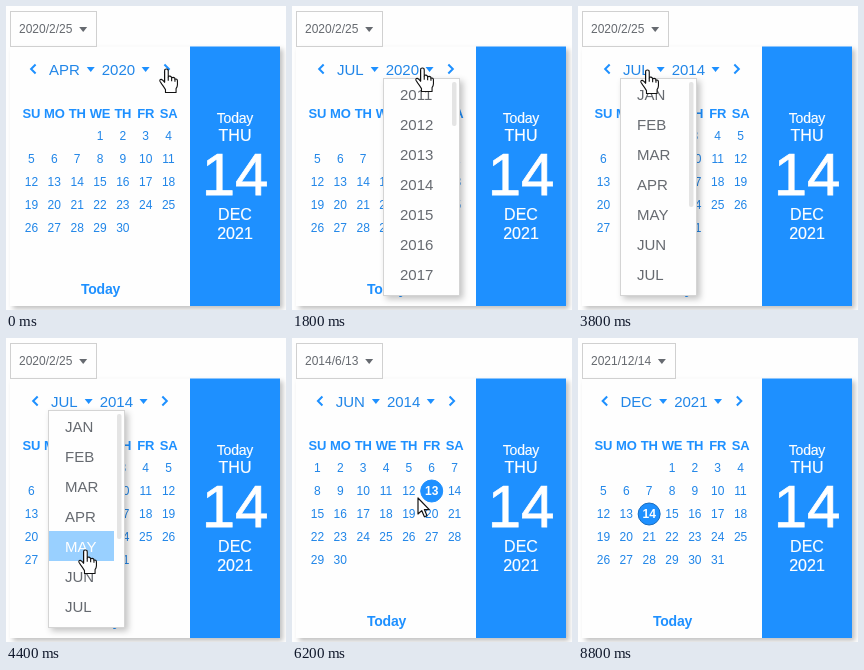
Recreate the animation shown at these times as an HTML page. Size 280 by 304 pixels, loop 9200 ms.

```html
<!DOCTYPE html>
<html lang="en">
<head>
<meta charset="utf-8">
<title>Date picker</title>
<style>
  html, body { margin: 0; width: 100%; height: 100%; overflow: hidden; background: #fefefe; }
  svg { display: block; width: 280px; height: 304px; font-family: "Liberation Sans", Arial, sans-serif; }
  .mid { text-anchor: middle; }
  .bold { font-weight: bold; }
  .tight { letter-spacing: -.2px; }
  .panel { filter: drop-shadow(3px 3px 2.5px rgba(0, 0, 0, .24)); }
  .pop { filter: drop-shadow(3px 3px 3px rgba(0, 0, 0, .24)); }
</style>
</head>
<body>
<svg id="stage" viewBox="0 0 280 304"></svg>
<script>
const LOOP = 9200, STEP = 200;
const BLUE = '#1e90ff', INK = '#2186e8', GRAY = '#666a70';
const MONTHS = 'JAN FEB MAR APR MAY JUN JUL AUG SEP OCT NOV DEC'.split(' ');
const WEEK = 'SU MO TH WE TH FR SA'.split(' ');
const ROW = 30, LIST_TOP = 73, LIST_H = 216.5;
const stage = document.getElementById('stage');

function add(parent, tag, attrs = {}, text) {
  const node = document.createElementNS('http://www.w3.org/2000/svg', tag);
  for (const key in attrs) node.setAttribute(key, attrs[key]);
  if (text !== undefined) node.textContent = text;
  parent.append(node);
  return node;
}

function label(parent, text, x, y, size, fill, cls = '') {
  return add(parent, 'text', { x, y, fill, class: cls, 'font-size': size }, text);
}

function caret(parent, x, y, fill) {
  add(parent, 'path', { d: `M${x - 4} ${y}h8l-4 5z`, fill });
}

function chevron(parent, x, dir) {
  add(parent, 'path', {
    d: `M${x - 2.2 * dir} 58.5l${4.5 * dir} 4.5l${-4.5 * dir} 4.5`,
    fill: 'none', stroke: BLUE, 'stroke-width': 2
  });
}

const colX = i => 14 + (i + .5) * 160 / 7;
const rowY = r => 130 + 23 * r;

// Static parts
const panel = add(stage, 'g', { class: 'panel' });
add(panel, 'rect', { x: 4, y: 40.5, width: 270, height: 259.5, fill: '#fefefe' });
add(panel, 'rect', { x: 184, y: 40.5, width: 90, height: 259.5, fill: BLUE });
[['Today', 117, 14, 'tight'], ['THU', 135, 16], ['14', 188.5, 60], ['DEC', 214, 16], ['2021', 233, 16]]
  .forEach(([text, y, size, cls = '']) => {
    const node = label(stage, text, 229, y, size, '#fff', 'mid ' + cls);
    node.setAttribute('stroke', '#fff');
    node.setAttribute('stroke-width', size / 80);
  });
WEEK.forEach((day, i) => label(stage, day, colX(i), 112, 13, BLUE, 'mid bold tight'));
label(stage, 'Today', 94.5, 288, 14, BLUE, 'mid bold tight');

const field = add(stage, 'g');
const head = add(stage, 'g');
const grid = add(stage, 'g');
const popup = add(stage, 'g');

const outline = { fill: '#fff', stroke: '#111', 'stroke-width': 1.2, 'stroke-linejoin': 'round' };
const hand = add(stage, 'g', outline);
const handShape = add(hand, 'g', { transform: 'translate(-.6 0) scale(.92 .98)' });
add(handShape, 'path', {
  d: 'M-2 2Q-2 0 0 0Q2 0 2 2V8.5Q2 7 4 7.3Q5.5 7.6 5.7 9Q7.5 8 9 9.2L9.3 10.3Q11.8 9.8 12 12V16' +
     'Q12 18 10.5 20V24H-1V21Q-3 18 -5 15.5L-7 12.5Q-7.6 10.4 -5.5 10.6Q-4 11 -2 13.5Z'
});
add(handShape, 'path', { d: 'M-2 13.5V2M2 8.5V12M5.7 9V12.5M9.3 10.3V13', fill: 'none' });
const arrow = add(stage, 'g', outline);
add(arrow, 'path', { d: 'M0 0V16L3.7 12.6L6.4 18.8L9 17.7L6.4 11.6H11.3Z' });

// State changes: time, then what becomes different
const start = { year: 2020, month: 3, picked: [2020, 1, 25], list: '', pointer: 'hand' };
const changes = [
  [200, { month: 4 }],
  [600, { month: 5 }],
  [1000, { month: 6 }],
  [1800, { list: 'year' }],
  [2600, { list: '', year: 2014 }],
  [2800, { pointer: 'arrow' }],
  [3400, { pointer: 'hand' }],
  [3800, { list: 'month' }],
  [5200, { list: '', month: 5, pointer: 'arrow' }],
  [6000, { picked: [2014, 5, 13] }],
  [7200, { pointer: 'hand' }],
  [7400, { picked: [2021, 11, 14], year: 2021, month: 11 }],
  [8800, { pointer: '' }]
];

// Pointer path: time, x, y of the tip
const path = [
  [0, 161, 63], [1000, 161, 63], [1400, 131, 62], [1800, 131, 62],
  [2000, 128, 90], [2400, 120, 176], [2600, 118, 172], [2800, 113, 169],
  [3000, 108, 150], [3400, 72, 64], [3800, 70, 64], [4000, 70, 82],
  [4400, 80, 212], [4800, 81, 236], [5200, 81, 234], [5800, 128, 158],
  [6000, 126, 160], [6400, 126, 160], [6600, 124, 172], [7200, 95, 279],
  [8000, 95, 279], [8800, 100, 308], [LOOP, 100, 308]
];

function pointerAt(t) {
  const i = path.findIndex(p => p[0] > t);
  const [t0, x0, y0] = path[i - 1], [t1, x1, y1] = path[i];
  const k = (t - t0) / (t1 - t0);
  return [x0 + (x1 - x0) * k, y0 + (y1 - y0) * k];
}

function drawField([y, m, d]) {
  field.replaceChildren();
  const text = label(field, `${y}/${m + 1}/${d}`, 13, 27, 12, GRAY);
  const w = text.getComputedTextLength();
  add(field, 'rect', { x: 4.5, y: 5.5, width: Math.round(w + 33), height: 35, fill: 'none', stroke: '#d0d0d0' });
  caret(field, 23.8 + w, 21, GRAY);
}

// Returns the left edges of both names, where the lists attach
function drawHead(s) {
  head.replaceChildren();
  const month = label(head, MONTHS[s.month], 0, 69, 15, INK);
  const year = label(head, s.year, 0, 69, 15, INK);
  const mw = month.getComputedTextLength(), yw = year.getComputedTextLength();
  const left = 94 - (69 + mw + yw) / 2;
  const monthX = left + 15.5, yearX = monthX + mw + 22;
  month.setAttribute('x', monthX);
  year.setAttribute('x', yearX);
  chevron(head, left, -1);
  caret(head, monthX + mw + 11, 61, BLUE);
  caret(head, yearX + yw + 10.5, 61, BLUE);
  chevron(head, yearX + yw + 31.5, 1);
  return { month: monthX, year: yearX };
}

function drawGrid(s) {
  grid.replaceChildren();
  const first = new Date(s.year, s.month, 1).getDay();
  const count = new Date(s.year, s.month + 1, 0).getDate();
  const [py, pm, pd] = s.picked;
  for (let d = 1; d <= count; d++) {
    const cell = first + d - 1;
    const x = colX(cell % 7), y = rowY(Math.floor(cell / 7));
    const on = py === s.year && pm === s.month && pd === d;
    if (on) {
      const ring = py === 2021 ? '#1a6dc0' : BLUE;
      add(grid, 'circle', { cx: x, cy: y, r: 11, fill: BLUE, stroke: ring });
    }
    label(grid, d, x, y + 4, 12, on ? '#fff' : INK, on ? 'mid bold' : 'mid');
  }
}

function drawList(s, edges, [px, py]) {
  popup.replaceChildren();
  if (!s.list) return;
  const isYear = s.list === 'year';
  const x = Math.round(edges[s.list] - 3) + .5;
  const box = add(popup, 'g', { class: 'pop' });
  add(box, 'rect', { x, y: LIST_TOP - .5, width: 76, height: LIST_H + .5, fill: '#fefefe', stroke: '#d4d4d4' });
  const over = px > x && px < x + 76 ? Math.floor((py - LIST_TOP) / ROW) : -1;
  for (let i = 0; i < 7; i++) {
    const y = LIST_TOP + ROW * i;
    if (i === over) add(popup, 'rect', { x: x + .5, y, width: 65, height: ROW, fill: '#99d0ff' });
    label(popup, isYear ? 2011 + i : MONTHS[i], x + 16.5, y + 21, 15, i === over ? '#fff' : GRAY);
  }
  add(popup, 'rect', { x: x + 68.5, y: 76, width: 4.5, height: isYear ? 44 : 125, rx: 2, fill: '#e4e4e4' });
}

function place(node, shown, [x, y]) {
  node.setAttribute('visibility', shown ? 'visible' : 'hidden');
  node.setAttribute('transform', `translate(${Math.round(x)} ${Math.round(y)})`);
}

function draw(t) {
  const s = Object.assign({}, start, ...changes.filter(c => c[0] <= t).map(c => c[1]));
  const tip = pointerAt(t);
  drawField(s.picked);
  const edges = drawHead(s);
  drawGrid(s);
  drawList(s, edges, tip);
  place(hand, s.pointer === 'hand', tip);
  place(arrow, s.pointer === 'arrow', tip);
}

let last = -1;
function tick() {
  const t = Math.floor(performance.now() % LOOP / STEP) * STEP;
  if (t !== last) draw(last = t);
  requestAnimationFrame(tick);
}
tick();
</script>
</body>
</html>
```
